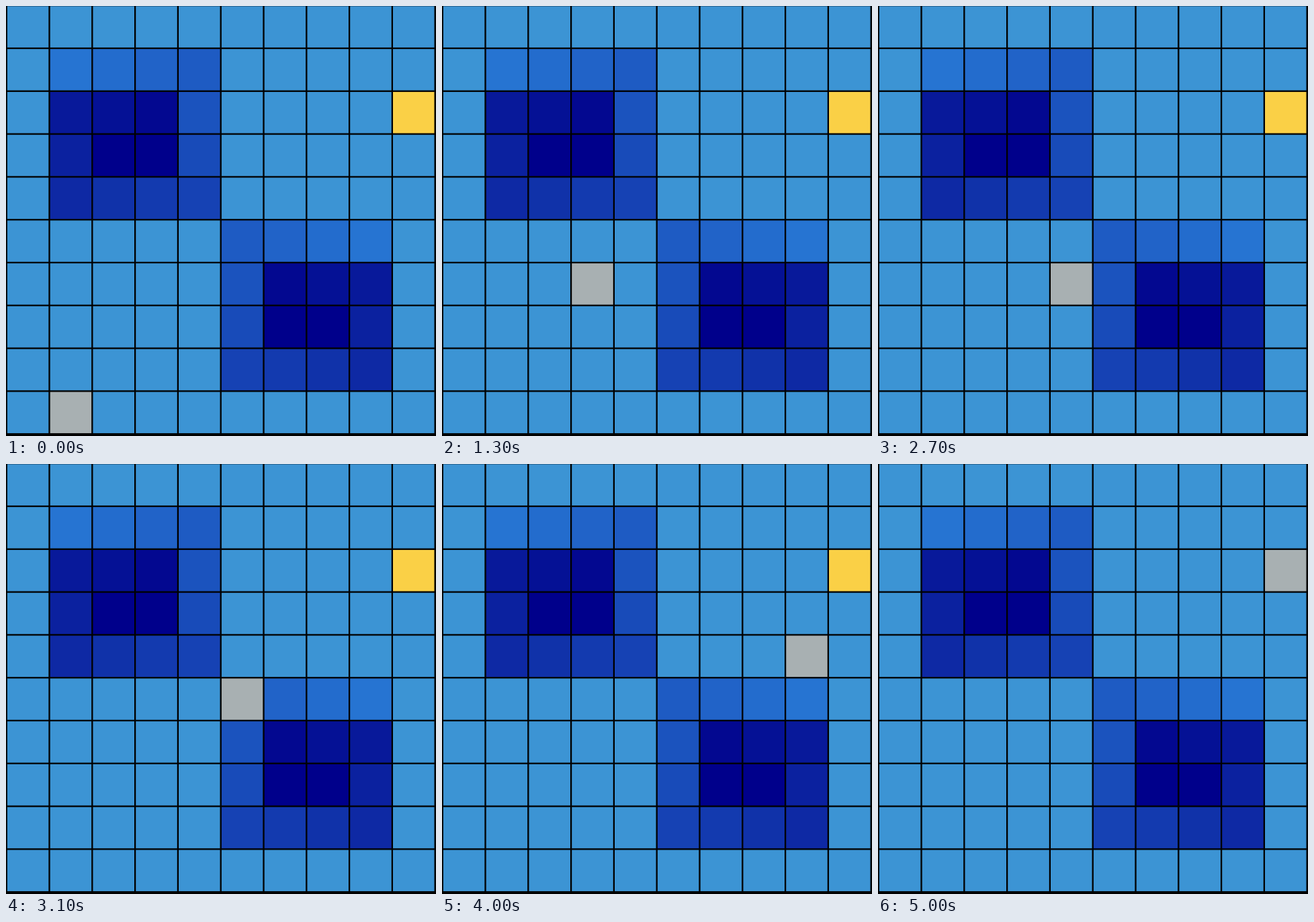
Write an HTML page with a canvas that moves like this. It is 600x600 px and loops after 5100 ms.

```html
<!DOCTYPE html>
<html lang="en">
<head>
<meta charset="utf-8">
<title>Grid walk</title>
<style>
  html, body { margin: 0; width: 100%; height: 100%; overflow: hidden; background: #000; }
  canvas { display: block; }
</style>
</head>
<body>
<canvas id="stage" width="600" height="600"></canvas>
<script>
const ctx = document.getElementById('stage').getContext('2d');
const LOOP = 5100, STEP = 250, SIZE = 10, PITCH = 59.8, LEFT = 0.7, TOP = -0.8;
const MOVES = { U: [0, -1], D: [0, 1], L: [-1, 0], R: [1, 0] };

// Cells visited when following a string of moves.
function walk(x, y, moves) {
  const cells = [[x, y]];
  for (const m of moves) {
    x += MOVES[m][0];
    y += MOVES[m][1];
    cells.push([x, y]);
  }
  return cells;
}

const path = walk(1, 9, 'RUURURUDUDURURRRRUU');
const spiral = walk(1, 1, 'RRRDDDLLLUURRDL');

function cell(x, y, color) {
  ctx.fillStyle = color;
  ctx.fillRect(LEFT + x * PITCH, TOP + y * PITCH, PITCH, PITCH);
}

// Each pool darkens along its spiral toward the centre.
function pools() {
  spiral.forEach(([x, y], i) => {
    const k = Math.max(0, 1 - i / 14);
    const color = `rgb(${38 * k}, ${116 * k}, ${139 + 71 * k})`;
    cell(x, y, color);
    cell(9 - x, y + 4, color);
  });
}

function gridLines() {
  ctx.fillStyle = '#000';
  for (let i = 0; i <= SIZE; i++) {
    ctx.fillRect(LEFT + i * PITCH - 1.1, 0, 2.2, 600);
    ctx.fillRect(0, TOP + i * PITCH - 1.1, 600, 2.2);
  }
}

function draw() {
  const t = performance.now() % LOOP;
  const [x, y] = path[Math.min(path.length - 1, Math.floor(t / STEP))];
  ctx.fillStyle = '#000';
  ctx.fillRect(0, 0, 600, 600);
  ctx.fillStyle = '#3c94d4';
  ctx.fillRect(LEFT, TOP, SIZE * PITCH, SIZE * PITCH);
  pools();
  cell(9, 2, '#fad046');
  cell(x, y, '#a8b0b2');
  gridLines();
  requestAnimationFrame(draw);
}
draw();
</script>
</body>
</html>
```
